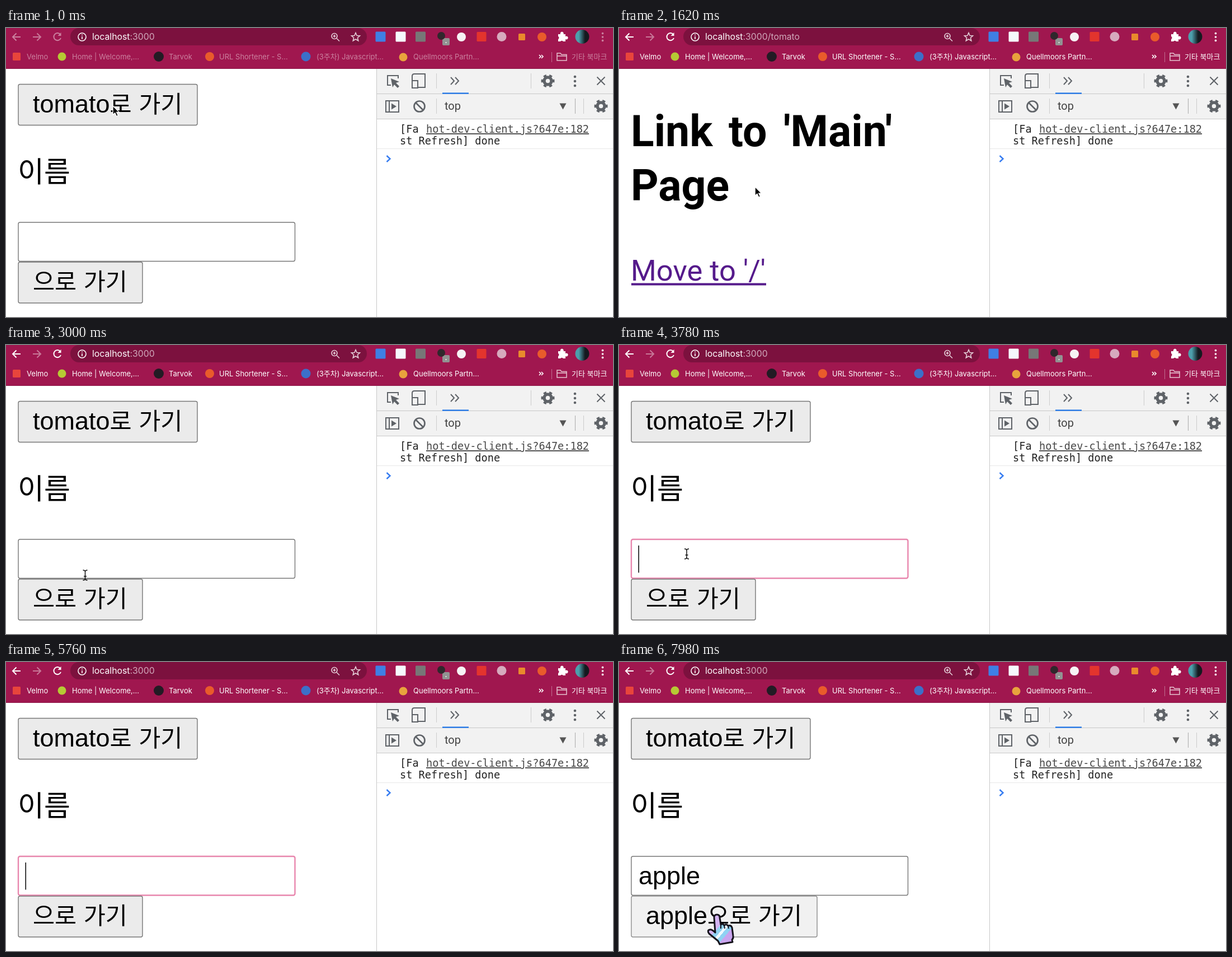
Write an HTML page that moves like this. It is 1085 by 516 pixels and loops after 8000 ms.

```html
<!DOCTYPE html>
<html lang="ko">
<head>
<meta charset="utf-8">
<title>Router demo</title>
<style>
html, body { margin: 0; width: 100%; height: 100%; overflow: hidden; background: #fff; }
svg { display: block; width: 1085px; height: 516px; }
text { white-space: pre; }
.ui { font-family: Inter, "Noto Sans CJK KR", sans-serif; fill: #fff; }
.form { font-family: "Liberation Sans", "Noto Sans CJK KR", sans-serif; font-size: 45px; }
.page { font-family: Roboto, "Noto Sans CJK KR", sans-serif; }
.mono { font-family: "DejaVu Sans Mono", monospace; font-size: 18.6px; fill: #222; }
.line { fill: none; stroke: currentColor; stroke-width: 2; }
</style>
</head>
<body>
<svg viewBox="0 0 1085 516">
  <defs>
    <linearGradient id="handFill" x1="0" y1="0" x2="1" y2="1">
      <stop offset=".42" stop-color="#d3b4f2"/><stop offset=".42" stop-color="#8fd2f3"/>
      <stop offset=".53" stop-color="#8fd2f3"/><stop offset=".53" stop-color="#eef8ff"/>
      <stop offset=".6" stop-color="#eef8ff"/><stop offset=".6" stop-color="#8fd2f3"/>
      <stop offset=".7" stop-color="#8fd2f3"/><stop offset=".7" stop-color="#c9a4ee"/>
    </linearGradient>
    <linearGradient id="photo">
      <stop offset=".25" stop-color="#4d9fac"/><stop offset=".7" stop-color="#15191f"/>
    </linearGradient>
    <g id="gear">
      <circle r="6.5" fill="none" stroke="#5f6368" stroke-width="5.5"/>
      <circle r="9.7" fill="none" stroke="#5f6368" stroke-width="4.6" pathLength="12" stroke-dasharray="1 1" stroke-dashoffset=".5"/>
    </g>
    <g id="dots"><circle cy="-8" r="2.3"/><circle r="2.3"/><circle cy="8" r="2.3"/></g>
  </defs>
  <rect width="1085" height="516" fill="#fff"/>

  <g id="mainPage">
    <g id="tomatoButton"><rect x="22" y="100.5" width="320" height="73" rx="3" stroke-width="1.4"/></g>
    <text class="page" x="21" y="275" font-size="51">이름</text>
    <rect id="input" x="22" y="347" width="494.5" height="69.5" rx="3" fill="#fff"/>
    <text id="typed" class="form" x="35" y="397"/>
    <rect id="caret" y="358" width="1.5" height="48.5"/>
    <g id="nameButton"><rect x="22" y="418" height="73" rx="3" stroke-width="1.4"/></g>
  </g>

  <g id="tomatoPage" class="page">
    <g font-size="77" font-weight="700">
      <text x="21" y="211">Link</text><text x="196" y="211">to</text><text x="294" y="211">'Main'</text>
      <text x="21" y="308">Page</text>
    </g>
    <text x="21" y="451" font-size="52.5" fill="#551a8b">Move to '/'</text>
    <rect x="22" y="455.5" width="241" height="4" fill="#551a8b"/>
  </g>

  <g id="devtools" color="#5f6368">
    <rect x="662" y="72" width="423" height="444" fill="#fff"/>
    <rect x="663" y="72" width="422" height="90" fill="#f2f2f2"/>
    <path d="M662.5 72V516M663 117.5H1085M663 162.5H1085" stroke="#c8c8c8"/>
    <path d="M663 215.5H1085" stroke="#e8e8e8"/>
    <path d="M769.5 81V108M938.5 81V108M769.5 126V153M1032.5 126V153" stroke="#ccc"/>
    <path d="M1017.5 126V153" stroke="#aaa"/>
    <rect x="780" y="115.5" width="47" height="2.2" fill="#1a73e8"/>
    <path class="line" d="M688 102H682V85H701V90M726 94V86Q726 82 730 82H749V106H736M726 94H736V107H726Z"/>
    <path d="M688 90L703 96L697 98L703 104L700 107L694 101L691 106Z" fill="#5f6368"/>
    <path class="line" d="M795 88L801 94.500L795 101M803 88L809 94.500L803 101"/>
    <path class="line" d="M1056.500 87.500L1070.500 101.500M1070.500 87.500L1056.500 101.500"/>
    <use href="#gear" x="968.5" y="94.5"/><use href="#gear" x="1063.5" y="139.5"/>
    <use href="#dots" x="1017" y="95" fill="#5f6368"/>
    <path class="line" d="M679 130H702V150H679ZM685 130V150"/>
    <path d="M689 134.500V145.500L698 140Z" fill="#5f6368"/>
    <circle class="line" cx="739" cy="140" r="9.5" style="stroke-width:2.7"/>
    <path class="line" d="M732 133L746 147" style="stroke-width:2.7"/>
    <text class="page" x="784" y="146" font-size="20" fill="#444">top</text>
    <path d="M989.500 134.500H1001.500L995.500 145.500Z" fill="#555"/>
    <text class="mono" x="704" y="187">[Fa</text>
    <text class="mono" x="751" y="187" text-decoration="underline" style="fill:#484848">hot-dev-client.js?647e:182</text>
    <text class="mono" x="704" y="208">st Refresh] done</text>
    <path d="M680.500 228L686.500 233.500L680.500 239" fill="none" stroke="#367cf1" stroke-width="2.4"/>
  </g>

  <g id="toolbar" color="#fff">
    <rect width="1085" height="72" fill="#a0174f"/>
    <rect y="72" width="1085" height="1" fill="#8b1646"/>
    <rect x="115" width="530" height="31" rx="15.5" fill="#7c113e"/>
    <g class="dim line">
      <path d="M26 16H12M18.500 9.500L12 16L18.500 22.500"/>
      <path d="M97 11.500A6.500 6.500 0 1 0 98 18"/>
      <path d="M98.500 8V14H92.500Z" fill="#fff" stroke="none"/>
    </g>
    <path class="line" opacity=".42" d="M48 16H62M55.500 9.500L62 16L55.500 22.500"/>
    <g class="line" style="stroke-width:1.6">
      <circle cx="136" cy="16" r="7"/><path d="M136 15V20M136 11.500V13.300"/>
    </g>
    <g class="line" opacity=".8" style="stroke-width:1.6">
      <circle cx="587" cy="14.500" r="5"/><path d="M591 18.500L596 23.500M584.500 14.500H589.500M587 12V17"/>
      <path d="M625 8.500L627.100 13.600L632.500 14L628.400 17.500L629.700 22.800L625 20L620.300 22.800L621.600 17.500L617.500 14L622.900 13.600Z"/>
    </g>
    <text class="ui" x="154" y="21" font-size="15.8">localhost<tspan id="path" fill="#d1a9bb"/></text>
    <rect x="780" y="18" width="13" height="13" rx="2" fill="#929292"/><circle cx="786.5" cy="26" r="1" fill="#fff"/>
    <path d="M987 11H991A3 3 0 1 1 996.500 11H1000V15A3 3 0 1 1 1000 20V24H996A3 3 0 0 0 991 24H987V20A2.800 2.800 0 0 0 987 15Z" fill="#fff"/>
    <circle cx="1030" cy="15.500" r="12.500" fill="url(#photo)"/>
    <use class="dim" href="#dots" transform="translate(1066.500 16) scale(.8)" fill="#fff"/>
    <path d="M975.500 43V61" stroke="#c06f91"/>
    <path d="M985 45H991L993 47.500H1002V58H985ZM985 50H1002" fill="none" stroke="#e5c3d0" stroke-width="1.5"/>
    <path d="M953 48L956 51L953 54M957 48L960 51L957 54" fill="none" stroke="#fff" stroke-width="1.6"/>
  </g>

  <g id="hand"><path d="M-5 5Q-5 0 0 0Q5 0 5 5L7 18Q10 15 13 19Q17 16 20 20Q25 18 27 23L29 38Q30 42 27 45L28 49L5 53L2 47L-14 34Q-18 28 -13 27Q-9 26 -3 32Z"
    fill="url(#handFill)" stroke="#15131c" stroke-width="3" stroke-linejoin="round"/>
    <path d="M7 18V25M13 19L14 25M20 20L21 25" stroke="#15131c" stroke-width="2"/></g>
  <path id="arrow" d="M0 0V16L3.800 12.500L6.500 18.500L9.300 17.300L6.600 11.500H11.500Z" fill="#000" stroke="#fff" stroke-width="1.3"/>
  <path id="ibeam" d="M-4 -9Q0 -9 0 -6Q0 -9 4 -9M0 -7V7M-4 9Q0 9 0 6Q0 9 4 9M-2.500 2H2.500" fill="none" stroke="#111" stroke-width="1.5"/>
</svg>
<script>
const NS = 'http://www.w3.org/2000/svg';
const LOOP = 8000, STEP = 60;
const $ = id => document.getElementById(id);

function add(parent, tag, attrs, text = '') {
  const node = document.createElementNS(NS, tag);
  for (const key in attrs) node.setAttribute(key, attrs[key]);
  node.textContent = text;
  parent.append(node);
  return node;
}

// Plain marks: [shape, x, y, half size, colour]
const marks = [
  ['square', 669.5, 15.5, 9, '#3f7fe4'], ['square', 705.5, 15.5, 9, '#f5f8fc'],
  ['square', 741, 15.5, 9, '#777'], ['circle', 778, 14, 7, '#30272c'],
  ['circle', 814, 16, 8, '#f6f2f4'], ['square', 850, 15.5, 8.5, '#e3342d'],
  ['circle', 886, 15.5, 8.5, '#d6aabd'], ['square', 922, 16, 6, '#e98a2c'],
  ['circle', 958, 16, 8, '#e95b2b'],
  ['square', 19, 51, 7, '#e8453c'], ['circle', 100, 51, 7.5, '#b6c934'],
  ['circle', 273, 51, 9, '#231b24'], ['circle', 364, 51, 8, '#e95b2b'],
  ['circle', 536, 51, 8.5, '#3c6fc9'], ['circle', 710, 52, 7.5, '#e8a33d']
];
for (const [shape, x, y, r, fill] of marks) {
  if (shape === 'circle') add($('toolbar'), 'circle', { cx: x, cy: y, r, fill });
  else add($('toolbar'), 'rect', { x: x - r, y: y - r, width: 2 * r, height: 2 * r, rx: 1.5, fill });
}
const bookmarks = [
  [37, 'Velmo'], [118, 'Home | Welcome,...'], [291, 'Tarvok'], [381, 'URL Shortener - S...'],
  [555, '(3주차) Javascript...'], [728, 'Quellmoors Partn...'], [1011, '기타 북마크']
];
for (const [x, label] of bookmarks)
  add($('toolbar'), 'text', { class: 'ui dim', x, y: 56, 'font-size': 13 }, label);

// Hangul runs are set a little smaller than the Latin text beside them.
function buttonLabel(button, y, latin, hangul) {
  const text = add(button, 'text', { class: 'form', x: 48, y });
  const lead = add(text, 'tspan', {}, latin);
  hangul.split(' ').forEach((word, i) => {
    if (i) add(text, 'tspan', {}, ' ');
    add(text, 'tspan', { 'font-size': 42.5 }, word);
  });
  return lead;
}
buttonLabel($('tomatoButton'), 150.5, 'tomato', '로 가기');
const nameLead = buttonLabel($('nameButton'), 467.5, '', '으로 가기');

const cursorPath = [
  [0, 191, 139], [300, 191, 139], [720, 277, 153], [1320, 277, 153], [2040, 187, 500],
  [2400, 162, 449], [2760, 162, 449], [3240, 121, 373], [6840, 121, 373], [7440, 175, 451], [LOOP, 175, 451]
];
const edits = [
  [3540, ''], [4440, 'a'], [4620, 'ap'], [4800, 'app'], [5280, 'ap'], [5460, 'a'], [5640, ''],
  [5880, 'a'], [6060, 'ap'], [6180, 'app'], [6300, 'appl'], [6420, 'apple']
];
const FOCUS = 3540, BLUR = 7680;

function cursorAt(t) {
  const i = cursorPath.findIndex(([end]) => t < end);
  const [t0, x0, y0] = cursorPath[i - 1], [t1, x1, y1] = cursorPath[i];
  const p = (t - t0) / (t1 - t0), k = p * p * (3 - 2 * p);
  return [x0 + (x1 - x0) * k, y0 + (y1 - y0) * k];
}

const show = (node, on) => node.setAttribute('display', on ? 'inline' : 'none');

function paintButton(button, hover, pressed) {
  const box = button.firstElementChild;
  box.setAttribute('fill', pressed ? '#f1f1f1' : hover ? '#e1e1e1' : '#ebebeb');
  box.setAttribute('stroke', pressed ? '#8d8d8d' : hover ? '#4f4f4f' : '#767676');
}

function render(t) {
  const active = t >= 420;
  const onTomato = t >= 1380 && t < 2700;
  const focused = t >= FOCUS && t < BLUR;
  const [editTime, value] = edits.findLast(([start]) => t >= start) || [0, ''];
  const [x, y] = cursorAt(t);
  const visible = t < 4440 || t >= 6840;

  document.querySelectorAll('.dim').forEach(node => node.setAttribute('opacity', active ? 1 : 0.45));
  $('path').textContent = onTomato ? ':3000/tomato' : ':3000';
  show($('mainPage'), !onTomato);
  show($('tomatoPage'), onTomato);

  $('typed').textContent = nameLead.textContent = value;
  const width = value ? $('typed').getComputedTextLength() : 0;
  const buttonWidth = 222 + width;
  $('nameButton').firstElementChild.setAttribute('width', buttonWidth);
  $('input').setAttribute('stroke', focused ? '#e886ad' : '#767676');
  $('input').setAttribute('stroke-width', focused ? 2.4 : 1.4);
  $('caret').setAttribute('x', 34.5 + width);
  show($('caret'), focused && (t - editTime) % 1000 < 500);

  const inside = (left, top, right, bottom) =>
    visible && active && x > left && x < right && y > top && y < bottom;
  const overTomato = !onTomato && inside(22, 100, 342, 174);
  const overName = !onTomato && inside(22, 418, 22 + buttonWidth, 491);
  const overLink = onTomato && inside(22, 405, 263, 462);
  const overInput = !onTomato && inside(22, 347, 516, 417);
  paintButton($('tomatoButton'), overTomato, t >= 1200 && t < 1320);
  paintButton($('nameButton'), overName, t >= BLUR);

  const kind = overTomato || overName || overLink ? 'hand' : overInput ? 'ibeam' : 'arrow';
  for (const id of ['hand', 'arrow', 'ibeam']) {
    show($(id), visible && id === kind);
    $(id).setAttribute('transform', `translate(${x} ${y})`);
  }
}

const start = performance.now();
function tick() {
  const t = (performance.now() - start) % LOOP;
  render(Math.floor(t / STEP) * STEP);
  requestAnimationFrame(tick);
}
tick();
</script>
</body>
</html>
```
